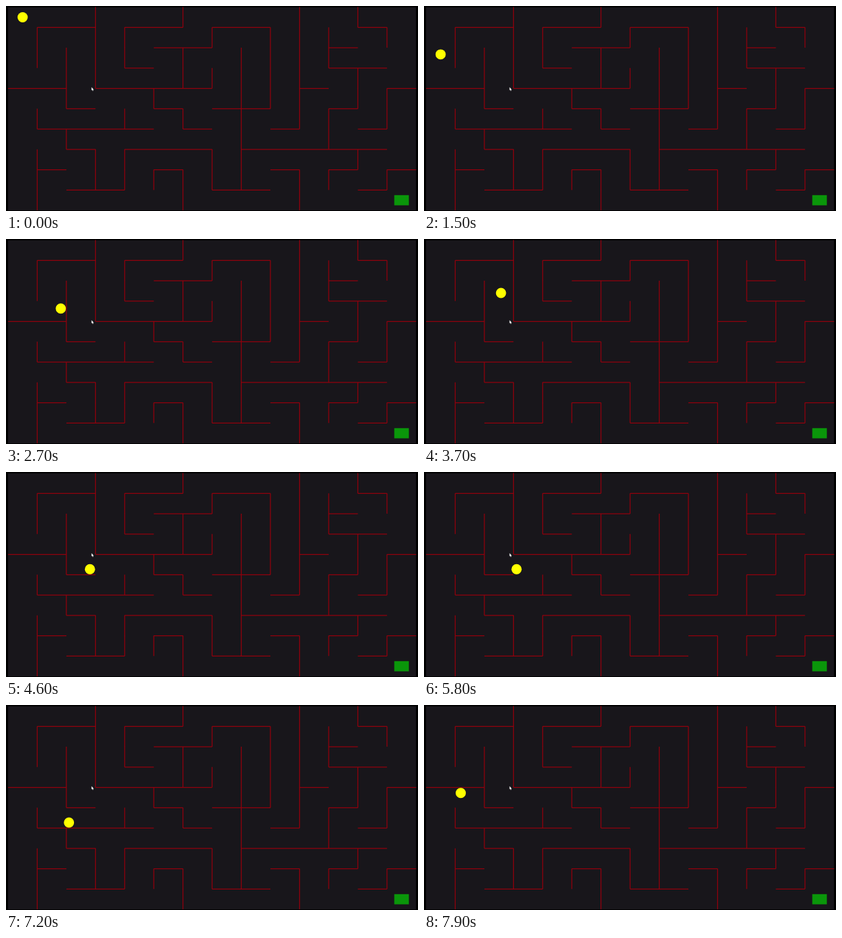
Recreate the animation shown at these times as an HTML page. Size 600x300 px, loop 8 s.

```html
<!DOCTYPE html>
<html lang="en">
<head>
<meta charset="utf-8">
<title>Maze</title>
<style>
  html, body { margin: 0; width: 100%; height: 100%; overflow: hidden; background: #000; }
  svg { display: block; width: 100vw; height: 100vh; }
</style>
</head>
<body>
<svg viewBox="0 0 600 300">
  <rect width="600" height="300" fill="#000"/>
  <rect x="3" y="2" width="594" height="297" fill="#18161b"/>
  <path id="walls" fill="none" stroke="#90000d" stroke-width="1.25"/>
  <rect id="goal" fill="#0a960a"/>
  <circle id="ball" fill="#ff0"/>
  <path d="M124.6 118.8V123.6L125.7 122.7L126.5 124.5L127.2 124.1L126.5 122.4H127.9Z" fill="#fff"/>
</svg>
<script>
  // Two characters per cell: "_" is a wall below it, "|" a wall to its right.
  const maze = [
    '  _ _|  _ _|  _ _  |   |_  ',
    ' |   | |  _ _|   | | |_  | ',
    ' | | | |_  |   | | | |_ _  ',
    '_ _| |_ _ _|_| | | |_  |  _',
    '   |_    |_   _|_| |  _| | ',
    ' |_ _ _|_  |_  |  _| |  _| ',
    '   |_   _ _ _  |_ _ _|_ _  ',
    ' |_  | |  _  | |  _   _|  _',
    ' |  _|_| | | |_|_  | |  _| ',
    ' |         |       |       '
  ];
  const ROWS = 10, COLS = 14;
  const LEFT = 3, TOP = 1.6, CELL_W = 42.45, CELL_H = 29.75;
  const RADIUS = CELL_H / 4, GAP = RADIUS + 0.65;

  const gridX = col => LEFT + col * CELL_W;
  const gridY = row => TOP + row * CELL_H;
  const wallBelow = (col, row) => maze[row]?.[2 * col] === '_';
  const wallRight = (col, row) => maze[row]?.[2 * col + 1] === '|';

  function setAttrs(id, attrs) {
    const node = document.getElementById(id);
    for (const name in attrs) node.setAttribute(name, attrs[name]);
  }

  let d = '';
  for (let row = 0; row < ROWS; row++) {
    for (let col = 0; col < COLS; col++) {
      if (wallBelow(col, row)) d += `M${gridX(col)} ${gridY(row + 1)}h${CELL_W}`;
      if (wallRight(col, row)) d += `M${gridX(col + 1)} ${gridY(row)}v${CELL_H}`;
    }
  }
  setAttrs('walls', { d });
  setAttrs('goal', {
    x: gridX(COLS - 0.75), y: gridY(ROWS - 0.75), width: CELL_W / 2, height: CELL_H / 2
  });
  setAttrs('ball', { r: RADIUS });

  const LOOP = 8000, TICK = 100, DELAY = 7, TICKS = 72, SUBSTEPS = 20;

  // Each push sets the ball's speed, in pixels per tick, along one axis.
  const pushes = [
    { at: 0.65, vy: 7.4 }, { at: 11.7, vx: 7.4 }, { at: 19.4, vy: -18 },
    { at: 22.3, vx: 4.2 }, { at: 26.3, vy: 10.7 }, { at: 32.5, vy: 6.3 },
    { at: 47.2, vx: 3.3 }, { at: 54.3, vy: 7.4 }, { at: 61.35, vx: -20 },
    { at: 68, vy: -11 }
  ];

  // Moves the ball by one substep; a wall in the way stops it.
  function move(ball) {
    const col = Math.floor((ball.x - LEFT) / CELL_W);
    const row = Math.floor((ball.y - TOP) / CELL_H);
    const minX = wallRight(col - 1, row) ? gridX(col) + GAP : -Infinity;
    const maxX = wallRight(col, row) ? gridX(col + 1) - GAP : Infinity;
    const minY = wallBelow(col, row - 1) ? gridY(row) + GAP : -Infinity;
    const maxY = wallBelow(col, row) ? gridY(row + 1) - GAP : Infinity;
    const x = ball.x + ball.vx / SUBSTEPS;
    const y = ball.y + ball.vy / SUBSTEPS;

    if (ball.vx > 0 && x > maxX || ball.vx < 0 && x < minX) {
      ball.x = ball.vx > 0 ? maxX : minX;
      ball.vx = 0;
    } else ball.x = x;

    if (ball.vy > 0 && y > maxY || ball.vy < 0 && y < minY) {
      ball.y = ball.vy > 0 ? maxY : minY;
      ball.vy = 0;
    } else ball.y = y;
  }

  function simulate() {
    const ball = { x: gridX(0.5), y: gridY(0.5), vx: 0, vy: 0 };
    const track = [];
    let next = 0;
    for (let i = 0; i <= TICKS * SUBSTEPS; i++) {
      if (i % SUBSTEPS === 0) track.push({ cx: ball.x, cy: ball.y });
      if (next < pushes.length && i / SUBSTEPS >= pushes[next].at) {
        Object.assign(ball, pushes[next++]);
      }
      move(ball);
    }
    return track;
  }

  const track = simulate();

  function render(ms) {
    const tick = Math.floor(ms % LOOP / TICK) - DELAY;
    setAttrs('ball', track[Math.max(0, tick)]);
  }

  const start = performance.now();
  function frame() {
    render(performance.now() - start);
    requestAnimationFrame(frame);
  }
  frame();
</script>
</body>
</html>
```
